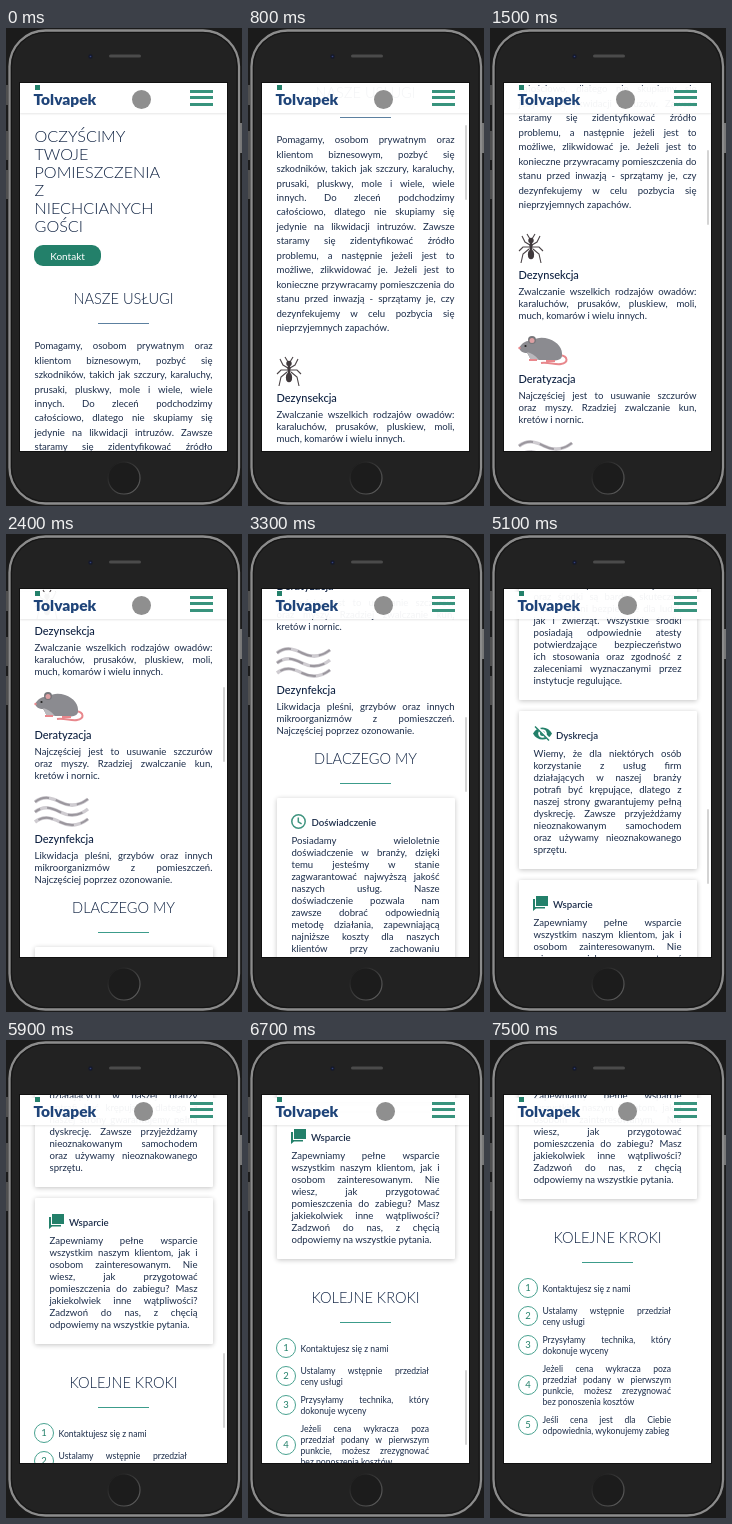
An HTML page that plays this animation: 236 by 478 pixels, repeating every 8000 ms.

```html
<!DOCTYPE html>
<html lang="pl">
<head>
<meta charset="utf-8">
<title>Strona mobilna</title>
<style>
html, body { margin: 0; width: 100%; height: 100%; overflow: hidden; background: #1b1b1b; }
body { position: relative; font-family: Lato, "Open Sans", sans-serif; color: #1c2d4a; }
svg { position: absolute; overflow: visible; }
#screen { position: absolute; left: 14px; top: 55px; width: 207px; height: 368px; overflow: hidden; background: #fff; }
#layer { position: absolute; left: -14px; top: -55px; width: 236px; height: 478px; }
#page, #page div, #layer > div { position: absolute; }
#page { left: 0; top: 0; width: 236px; }
#page .line { position: static; white-space: nowrap; }
#page .just { text-align-last: justify; }
#page .mid { text-align: center; }
#page .rule { width: 51px; height: 1.2px; left: 92px; background: #3c9c8b; }
#page .card { left: 28.5px; width: 178px; background: #fff; border-radius: 1px; box-shadow: 0 1px 5px rgba(0, 0, 0, .24); }
#page .button { left: 28px; top: 217px; width: 67px; height: 21px; border-radius: 9px; background: #23806a; }
#page .ring { left: 28px; width: 18px; height: 18px; border: 1px solid #4aa391; border-radius: 50%; }
#head { left: 14px; top: 58px; width: 207px; height: 27px; background: rgba(255, 255, 255, .95); box-shadow: 0 1px 2px rgba(0, 0, 0, .1); }
#name { left: 27.5px; top: 62px; font-size: 15.5px; line-height: 19px; font-weight: 900; color: #1f4479; }
#mark { left: 29px; top: 57px; width: 5px; height: 5px; background: #23806a; }
.bar { left: 184px; width: 23px; height: 3px; background: #38937d; }
#dot { top: 62px; width: 19px; height: 19px; border-radius: 50%; background: #8f8f8f; }
#thumb { left: 217px; top: 55px; width: 2px; height: 75px; border-radius: 1px; background: rgba(0, 0, 0, .17); }
</style>
</head>
<body>
<svg width="236" height="478" viewBox="0 0 236 478" fill="none">
  <defs>
    <linearGradient id="ring" x1="0" y1="0" x2="1" y2="1">
      <stop stop-color="#151515"/><stop offset="1" stop-color="#666"/>
    </linearGradient>
  </defs>
  <path d="M1 57v20M1 103v29M1 142v29" stroke="#505050" stroke-width="2"/>
  <path d="M235 95v30" stroke="#777" stroke-width="2"/>
  <rect x="3.500" y="2.500" width="229.500" height="473" rx="36" fill="#1f1f1f" stroke="#8c8c8c" stroke-width="2.300"/>
  <rect x="5.500" y="4.500" width="225.500" height="469" rx="34" fill="#222" stroke="#141414"/>
  <rect x="13" y="54" width="209" height="370" fill="#111"/>
  <rect x="103" y="26.500" width="32" height="3" rx="1.500" fill="#4b4b4b"/>
  <circle cx="84.500" cy="28.500" r="2.200" fill="#15192c"/>
  <circle cx="84.500" cy="28.500" r=".8" fill="#34427a"/>
  <circle cx="118" cy="450" r="16" fill="#1c1c1c" stroke="url(#ring)" stroke-width="1.200"/>
</svg>

<div id="screen"><div id="layer">
  <div id="page"></div>
  <div id="head"></div>
  <div id="mark"></div>
  <div id="name">Tolvapek</div>
  <div class="bar" style="top:62px"></div>
  <div class="bar" style="top:68px"></div>
  <div class="bar" style="top:75px"></div>
  <div id="dot"></div>
  <div id="thumb"></div>
</div></div>

<script>
const $ = id => document.getElementById(id);
const page = $("page");

function box(cls, style = {}, parent = page) {
  const el = document.createElement("div");
  el.className = cls;
  Object.assign(el.style, style);
  return parent.appendChild(el);
}

// y is the centre of the first line; "|" separates lines
function text(x, y, width, size, pitch, copy, style = {}, cls = "just") {
  const block = box("text", {
    left: x + "px", top: y - pitch / 2 + "px", width: width + "px",
    fontSize: size + "px", lineHeight: pitch + "px", ...style
  });
  copy.split("|").forEach((line, i, all) => {
    const justify = cls !== "just" || i < all.length - 1;
    box("line " + (justify ? cls : ""), {}, block).textContent = line;
  });
}

function icon(x, y, w, h, shapes) {
  page.insertAdjacentHTML("beforeend",
    `<svg style="left:${x}px;top:${y}px" width="${w}" height="${h}" viewBox="0 0 ${w} ${h}">${shapes}</svg>`);
}

const LIGHT = { fontWeight: 300, color: "#0f2242" };
const BODY = 9.6;

function heading(y, copy, color) {
  text(28, y - .5, 179, 14.6, 18, copy, LIGHT, "mid");
  box("rule", { top: y + 23 + "px", ...(color && { background: color }) });
}

function service(y, title, copy) {
  text(28.5, y, 178, 11, 14, title, { fontWeight: 500, color: "#0f2242" }, "");
  text(28.5, y + 17, 178, BODY, 12, copy);
}

function card(top, bottom, titleX, title, copy) {
  box("card", { top: top + "px", height: bottom - top + "px" });
  text(titleX, top + 23.5, 120, 9.7, 12, title, { fontWeight: 600 }, "");
  text(43.5, top + 42.5, 148, BODY, 12, copy);
}

text(28.5, 108, 178, 16.2, 18, "OCZYŚCIMY|TWOJE|POMIESZCZENIA|Z|NIECHCIANYCH|GOŚCI", LIGHT, "");
box("button");
text(28, 227.5, 67, 10, 12, "Kontakt", { color: "#fff" }, "mid");

heading(271.6, "NASZE USŁUGI", "#5c80a0");
text(28.5, 318.5, 178, BODY, 14.43,
  "Pomagamy, osobom prywatnym oraz|klientom biznesowym, pozbyć się|szkodników, takich jak szczury, karaluchy,|" +
  "prusaki, pluskwy, mole i wiele, wiele|innych. Do zleceń podchodzimy|całościowo, dlatego nie skupiamy się|" +
  "jedynie na likwidacji intruzów. Zawsze|staramy się zidentyfikować źródło|problemu, a następnie jeżeli jest to|" +
  "możliwe, zlikwidować je. Jeżeli jest to|konieczne przywracamy pomieszczenia do|stanu przed inwazją - sprzątamy je, czy|" +
  "dezynfekujemy w celu pozbycia się|nieprzyjemnych zapachów.");

// ant
icon(28, 534, 26, 31, `
  <path d="M12 12 7 9 4 3M14 12l5-3 3-6M11 14H5l-4 4M15 14h6l4 4M11 16l-6 5-2 9M15 16l6 5 2 9M12 6 9 1M14 6l3-5"
    fill="none" stroke="#4a4346" stroke-width="1.100"/>
  <g fill="#3f383b"><ellipse cx="13" cy="7.500" rx="2.700" ry="2.800"/><ellipse cx="13" cy="13.500" rx="1.700" ry="4"/>
  <ellipse cx="13" cy="21.500" rx="3.100" ry="4.800"/></g>`);
service(576, "Dezynsekcja", "Zwalczanie wszelkich rodzajów owadów:|karaluchów, prusaków, pluskiew, moli,|much, komarów i wielu innych.");

// rat
icon(28, 636, 50, 31, `
  <path d="M42 20c8 1 9 8 1 9-6 1-12-2-20-1" fill="none" stroke="#e8878c" stroke-width="2"/>
  <path d="M1 13C4 8 8 5 14 6c5-4 11-4 17-2 9 3 14 10 13 17-1 5-8 5-14 4H14c-3-2-3-5-5-7-4 0-7-2-8-5z" fill="#8b8b90"/>
  <path d="M9 17c4 1 8 3 12 8h-7c-3-2-3-5-5-8z" fill="#b9b8bc"/>
  <path d="M11 25h8M28 26h9" stroke="#e8878c" stroke-width="2.200"/>
  <circle cx="14" cy="5" r="4" fill="#77777b"/><circle cx="14" cy="5.500" r="2.500" fill="#dda0a3"/>
  <circle cx="7.500" cy="11" r="1.100" fill="#222"/><circle cx="1.500" cy="13" r="1.200" fill="#e8878c"/>`);
service(679.5, "Deratyzacja", "Najczęściej jest to usuwanie szczurów|oraz myszy. Rzadziej zwalczanie kun,|kretów i nornic.");

// air waves
const wave = "c9-7 17-4 25 0s18 5 28-3";
icon(28, 741, 55, 30, [6, 16, 26].map((y, i) =>
  `<g fill="none"><path d="M1 ${y}${wave}" stroke="#cfccd1" stroke-width="3.500"/>
   <path d="M1 ${y}${wave}" stroke="#9b979e" stroke-width="2" stroke-dasharray="15 7" stroke-dashoffset="${i * 9}"/></g>`).join(""));
service(784, "Dezynfekcja", "Likwidacja pleśni, grzybów oraz innych|mikroorganizmów z pomieszczeń.|Najczęściej poprzez ozonowanie.");

heading(853.5, "DLACZEGO MY");
card(892, 1074, 63.5, "Doświadczenie",
  "Posiadamy wieloletnie|doświadczenie w branży, dzięki|temu jesteśmy w stanie|zagwarantować najwyższą jakość|" +
  "naszych usług. Nasze|doświadczenie pozwala nam|zawsze dobrać odpowiednią|metodę działania, zapewniającą|" +
  "najniższe koszty dla naszych|klientów przy zachowaniu|najwyższej skuteczności.");
icon(43, 908, 15, 15, `<g fill="none" stroke="#3f947f" stroke-width="1.500"><circle cx="7.500" cy="7.500" r="6.700"/><path d="M7.300 3.500v4.300l3.300 2"/></g>`);

card(1085, 1243, 59.5, "Bezpieczeństwo",
  "Stosowane przez nas urządzenia|oraz środki są bardzo skuteczne|oraz w pełni bezpieczne dla ludzi,|jak i zwierząt. Wszystkie środki|" +
  "posiadają odpowiednie atesty|potwierdzające bezpieczeństwo|ich stosowania oraz zgodność z|zaleceniami wyznaczanymi przez|instytucje regulujące.");
icon(43, 1100, 12, 15, `<path d="M3 6V4a3 3 0 0 1 6 0v2" fill="none" stroke="#23806a" stroke-width="1.400"/>
  <rect y="5" width="12" height="10" rx="1.300" fill="#23806a"/><circle cx="6" cy="10" r="1.400" fill="#fff"/>`);

card(1254, 1412, 66, "Dyskrecja",
  "Wiemy, że dla niektórych osób|korzystanie z usług firm|działających w naszej branży|potrafi być krępujące, dlatego z|" +
  "naszej strony gwarantujemy pełną|dyskrecję. Zawsze przyjeżdżamy|nieoznakowanym samochodem|oraz używamy nieoznakowanego|sprzętu.");
icon(43, 1269, 19, 15, `<path d="M0 7.500C4-.5 15-.5 19 7.500c-4 8-15 8-19 0z" fill="#23806a"/>
  <circle cx="9.500" cy="7.500" r="4.300" fill="#fff"/><circle cx="9.500" cy="7.500" r="2.500" fill="#23806a"/>
  <path d="M3 0l14 14" stroke="#fff" stroke-width="3"/><path d="M2 .5l14 14" stroke="#23806a" stroke-width="1.400"/>`);

card(1423, 1569, 63, "Wsparcie",
  "Zapewniamy pełne wsparcie|wszystkim naszym klientom, jak i|osobom zainteresowanym. Nie|wiesz, jak przygotować|" +
  "pomieszczenia do zabiegu? Masz|jakiekolwiek inne wątpliwości?|Zadzwoń do nas, z chęcią|odpowiemy na wszystkie pytania.");
icon(43, 1439, 15, 15, `<path d="M0 3h2v8h10v1.500H3L0 15z" fill="#23806a"/><path d="M3 0h12v10H3z" fill="#23806a"/>`);

heading(1608.5, "KOLEJNE KROKI");
[
  [1658, "Kontaktujesz się z nami"],
  [1686, "Ustalamy wstępnie przedział|ceny usługi"],
  [1715, "Przysyłamy technika, który|dokonuje wyceny"],
  [1755, "Jeżeli cena wykracza poza|przedział podany w pierwszym|punkcie, możesz zrezygnować|bez ponoszenia kosztów"],
  [1795, "Jeśli cena jest dla Ciebie|odpowiednia, wykonujemy zabieg"]
].forEach(([y, copy], i) => {
  const rows = copy.split("|").length;
  box("ring", { top: y - 10 + "px" });
  text(28, y, 20, 9.5, 12, String(i + 1), { color: "#23806a" }, "mid");
  text(52.5, y - (rows - 1) * 5.5, 128.5, 8.65, 11, copy);
});

// swipes: [time, scroll offset]
const keys = [
  [0, 0], [300, 0], [700, 170], [1100, 291], [1500, 328.5], [1800, 333], [1900, 333],
  [2300, 450], [2800, 580], [3300, 627.5], [4000, 913.5], [4600, 965], [4800, 965],
  [5100, 1076.5], [5500, 1214], [5900, 1264.5], [6100, 1268], [6300, 1268],
  [6700, 1350], [7200, 1408], [7500, 1409.5], [8000, 1409.5]
];
const slope = i => (keys[i + 1][1] - keys[i][1]) / (keys[i + 1][0] - keys[i][0]);
// harmonic mean keeps the curve monotone
const tangent = i => {
  if (i === 0 || i === keys.length - 1) return 0;
  const a = slope(i - 1), b = slope(i);
  return a * b > 0 ? 2 * a * b / (a + b) : 0;
};

function scrollAt(t) {
  const i = keys.findIndex(k => k[0] > t) - 1;
  const [t0, y0] = keys[i], [t1, y1] = keys[i + 1];
  const d = t1 - t0, u = (t - t0) / d, v = 1 - u;
  return y0 * v * v * (1 + 2 * u) + y1 * u * u * (3 - 2 * u)
    + d * u * v * (tangent(i) * v - tangent(i + 1) * u);
}

const clamp = v => Math.min(1, Math.max(0, v));
const STEP = 100, LOOP = 8000;

function draw() {
  const t = Math.floor(performance.now() % LOOP / STEP) * STEP;
  const y = Math.round(scrollAt(t)); // whole pixels keep the text sharp
  page.style.transform = `translateY(${-y}px)`;
  $("thumb").style.transform = `translateY(${Math.round(y * .204)}px)`;
  $("thumb").style.opacity = t < 400 ? 0 : clamp((7500 - t) / 300);
  $("dot").style.left = 126 + 2 * clamp((t - 2600) / 3000) + "px";
  requestAnimationFrame(draw);
}
draw();
</script>
</body>
</html>
```
